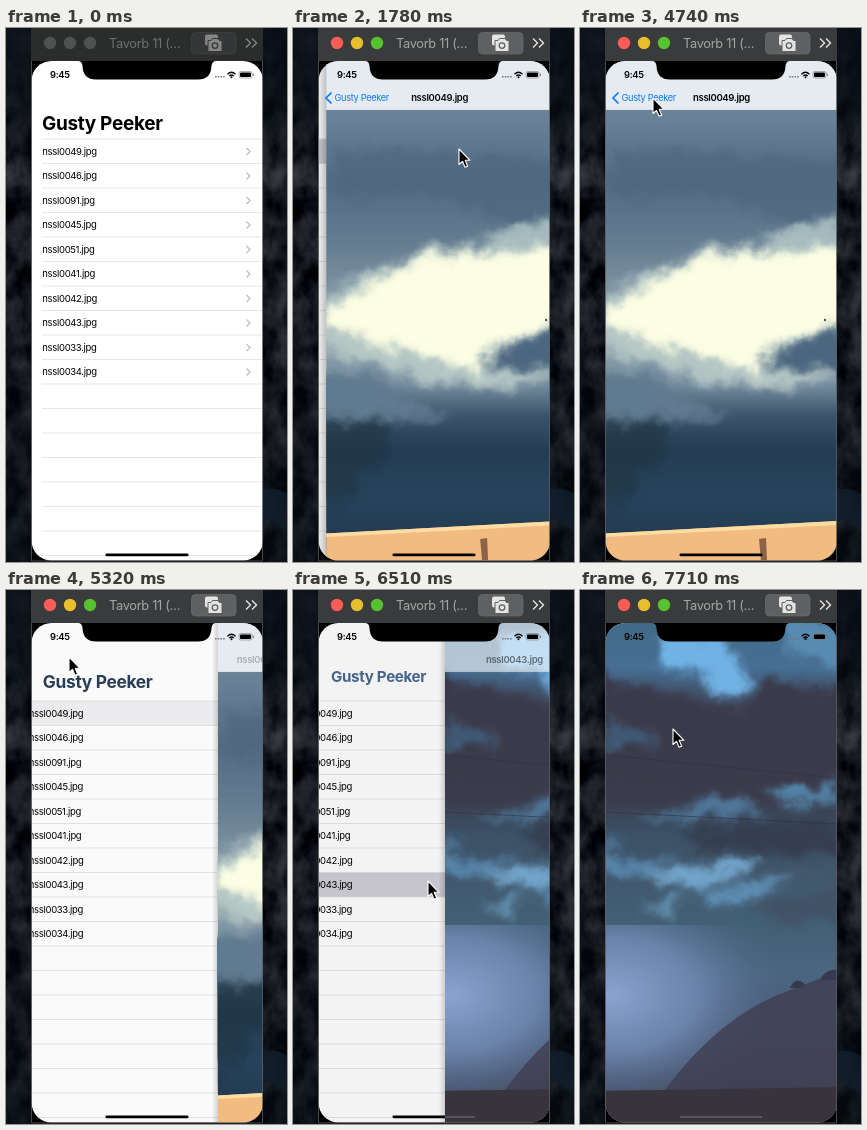
An HTML page that plays this animation: 281 by 534 pixels, repeating every 8000 ms.

```html
<!DOCTYPE html>
<html lang="en">
<head>
<meta charset="utf-8">
<style>
  html, body { margin: 0; width: 281px; height: 534px; overflow: hidden; background: #090d13; }
  svg { display: block; font-family: Inter, Roboto, sans-serif; letter-spacing: -.02em; }
</style>
</head>
<body>
<svg width="281" height="534" viewBox="0 0 281 534">
  <defs>
    <clipPath id="screen"><rect x="25.5" y="33" width="231.5" height="499.5" rx="20"/></clipPath>
    <filter id="rock" x="0" y="0" width="1" height="1" color-interpolation-filters="sRGB">
      <feTurbulence type="fractalNoise" baseFrequency=".045 .03" numOctaves="5" seed="8"/>
      <feColorMatrix values=".42 0 0 0 -.13  .42 0 0 0 -.12  .42 0 0 0 -.095  0 0 0 0 1"/>
    </filter>
    <filter id="cloud" filterUnits="userSpaceOnUse" x="0" y="20" width="281" height="530" color-interpolation-filters="sRGB">
      <feGaussianBlur stdDeviation="5" result="soft"/>
      <feTurbulence type="fractalNoise" baseFrequency=".035" numOctaves="4" seed="4"/>
      <feDisplacementMap in="soft" scale="26" xChannelSelector="R" yChannelSelector="G"/>
    </filter>
    <linearGradient id="night" x2="0" y2="1">
      <stop stop-color="#0a1018" stop-opacity=".85"/><stop offset=".16" stop-color="#0a1018" stop-opacity=".5"/>
      <stop offset=".25" stop-color="#0a1018" stop-opacity="0"/><stop offset=".6" stop-color="#0a1018" stop-opacity=".1"/>
      <stop offset="1" stop-color="#0a1018" stop-opacity=".55"/>
    </linearGradient>
    <linearGradient id="storm" gradientUnits="userSpaceOnUse" x1="0" y1="33" x2="0" y2="533">
      <stop stop-color="#71899c"/><stop offset=".12" stop-color="#698197"/><stop offset=".24" stop-color="#536b83"/>
      <stop offset=".36" stop-color="#647c90"/><stop offset=".55" stop-color="#90a5b0"/><stop offset=".65" stop-color="#728a9c"/>
      <stop offset=".71" stop-color="#3b536a"/><stop offset=".78" stop-color="#243d53"/><stop offset=".87" stop-color="#27435c"/>
      <stop offset="1" stop-color="#20374c"/>
    </linearGradient>
    <linearGradient id="dusk" gradientUnits="userSpaceOnUse" x1="0" y1="33" x2="0" y2="533">
      <stop stop-color="#416987"/><stop offset=".09" stop-color="#476f93"/><stop offset=".17" stop-color="#3c4052"/>
      <stop offset=".35" stop-color="#3b3b4b"/><stop offset=".42" stop-color="#3b5166"/><stop offset=".5" stop-color="#41576c"/>
      <stop offset=".6" stop-color="#426075"/><stop offset=".7" stop-color="#4b6580"/><stop offset="1" stop-color="#434a60"/>
    </linearGradient>
    <radialGradient id="glow" gradientUnits="userSpaceOnUse" cx="30" cy="405" r="175" gradientTransform="translate(0 140) scale(1 .655)">
      <stop stop-color="#8ba3d0"/><stop offset=".5" stop-color="#7189b3" stop-opacity=".85"/><stop offset="1" stop-color="#53698b" stop-opacity="0"/>
    </radialGradient>
    <linearGradient id="edge"><stop stop-opacity="0"/><stop offset="1" stop-opacity=".16"/></linearGradient>
  </defs>

  <rect width="281" height="534" filter="url(#rock)"/>
  <path d="M257 462Q270 458 281 466V502L257 490Z" fill="#14283c" opacity=".75"/>
  <rect width="281" height="534" fill="url(#night)"/>

  <path d="M25 0H257V534H25Z" fill="#000"/>
  <rect id="titleBar" x="25" width="232" height="33"/>
  <g id="lights"><circle cx="44" cy="15" r="6.2"/><circle cx="64" cy="15" r="6.2"/><circle cx="84" cy="15" r="6.2"/></g>
  <text id="device" x="103" y="20" font-size="12.8">Tavorb 11 (…</text>
  <rect id="shotButton" x="185.5" y="4.5" width="44.5" height="21.5" rx="4"/>
  <g id="tools">
    <rect x="199" y="6.5" width="13" height="11" rx="2"/>
    <path id="camera" d="M202 12.5H205L206.5 10.5H212L213.5 12.5H216V23.5H202Z" stroke-width="1"/>
    <circle id="lens" cx="209" cy="17.6" r="2.8" fill="none" stroke-width="1.3"/>
    <path id="more" d="M240 10.5L244.5 15L240 19.5M246 10.5L250.5 15L246 19.5" fill="none" stroke-width="1.4"/>
  </g>

  <g clip-path="url(#screen)">
    <rect x="25" y="33" width="232" height="500" fill="#fff"/>
    <g id="list">
      <rect id="selection" x="25" width="232" height="24.5" fill="#d0cfd5"/>
      <g id="rows" font-size="9.5"></g>
    </g>
    <text id="heading" font-weight="700">Gusty Peeker</text>
    <rect id="shade" x="25" y="33" width="232" height="500"/>

    <g id="detail">
      <rect x="19" y="33" width="6" height="500" fill="url(#edge)"/>
      <svg id="view" x="25" y="33" width="232" height="500" viewBox="25 33 232 500">
        <g id="stormPhoto">
          <rect x="25" y="33" width="232" height="500" fill="url(#storm)"/>
          <g filter="url(#cloud)">
            <path d="M40 175Q120 150 190 185T270 165V130L30 120Z" fill="#4f677f" opacity=".7"/>
            <path d="M185 215Q210 192 260 188V225Z" fill="#a4b9bd"/>
            <path d="M15 268Q70 250 105 228Q180 215 270 214V345Q200 372 140 352Q70 342 15 312Z" fill="#b4c6c4"/>
            <path d="M25 278Q80 256 105 234Q185 222 270 219V290L188 318L180 345Q130 330 90 320Q55 306 25 300Z" fill="#fcfee3"/>
            <path d="M270 295Q215 310 182 334Q210 349 270 345Z" fill="#4c6680"/>
            <path d="M10 350Q70 340 110 372L150 388L10 396Z" fill="#607a8f"/>
            <path d="M10 392H90V425L10 500Z" fill="#203442" opacity=".6"/>
          </g>
          <path d="M25 505.500L257 493V533H25Z" fill="#f2bc80"/>
          <path d="M25 505.500L257 493V497L25 509Z" fill="#ffdca2"/>
          <path d="M179 511L186 510L187 533H181Z" fill="#8d6347"/>
          <circle cx="245" cy="292" r="1.200" fill="#455564"/>
        </g>
        <g id="duskPhoto">
          <rect x="25" y="33" width="232" height="500" fill="url(#dusk)"/>
          <rect x="25" y="335" width="232" height="165" fill="url(#glow)"/>
          <g filter="url(#cloud)">
            <path d="M75 48L140 42L170 95L150 112L125 82L85 78Z" fill="#70b2e4"/>
            <path d="M190 30H265V75L215 70Z" fill="#588bb2"/>
            <path d="M15 80L60 100L120 110L160 130L190 90L270 100V195L15 195Z" fill="#3b3a4a"/>
            <path d="M25 130L65 140L80 158L25 158Z" fill="#3f5974"/>
            <path d="M190 200L215 191L235 202L255 186V214L205 214Z" fill="#5283a7"/>
            <path d="M50 225L100 220L152 207L185 222L120 232Z" fill="#4f789a"/>
            <path d="M90 240L200 228L265 236V268L130 262Z" fill="#363f51"/>
            <path d="M20 252L55 270L100 268L60 286L20 280Z" fill="#5584a8"/>
            <path d="M55 284L115 278L180 268L160 286L105 300Z" fill="#73a6cd"/>
            <path d="M120 302L175 292L215 284L180 308L130 315Z" fill="#5e8fb4"/>
            <path d="M60 312L115 308L85 323Z" fill="#6595b7"/>
            <path d="M170 310L265 295V330L200 335Z" fill="#425368"/>
          </g>
          <path d="M257 382L210 400Q140 425 85 500H257Z" fill="#403e50" opacity=".8"/>
          <path d="M210 398Q215 386 225 394L222 398ZM240 390Q246 378 257 380V390Z" fill="#363a4e"/>
          <path d="M25 165L257 188M25 222L257 234" fill="none" stroke="#30303e" stroke-width=".6"/>
          <path d="M25 501L257 497V533H25Z" fill="#38343d"/>
        </g>
        <g id="bar">
          <rect id="barFill" x="25" y="33" width="232" height="49" fill="#fafcff"/>
          <path d="M25 82H257" stroke="#8998a5" stroke-width=".5" opacity=".5"/>
        </g>
      </svg>
    </g>
    <g id="barText">
      <g id="back" fill="#0a7aff">
        <path d="M38.500 64.500L33 70L38.500 75.500" fill="none" stroke="#0a7aff" stroke-width="1.700"/>
        <text x="41.500" y="73.400" font-size="9.200">Gusty Peeker</text>
      </g>
      <text id="photoName" y="73.400" font-size="9.500" font-weight="600" text-anchor="middle"></text>
    </g>

    <path d="M72 33Q76 33 76.500 38Q77 51.500 90 51.500H192Q205 51.500 205.500 38Q206 33 210 33Z"/>
    <text x="44" y="50.300" font-size="9.400" font-weight="600">9:45</text>
    <path d="M209 48.700H219" stroke="#777" stroke-width="1.600" stroke-dasharray="1.600 1.100"/>
    <path d="M221.500 46.200Q225.500 42.500 229.500 46.200M223.300 48Q225.500 46 227.700 48" fill="none" stroke="#000" stroke-width="1.400"/>
    <circle cx="225.500" cy="49.300" r="1"/>
    <rect x="233" y="43.500" width="13" height="6.500" rx="1.800" fill="none" stroke="#777" stroke-width=".6"/>
    <rect x="234" y="44.400" width="11" height="4.700" rx="1"/>
    <path d="M247.300 45.600V48" stroke="#777"/>
    <rect x="99.500" y="525.500" width="83" height="2.700" rx="1.300"/>
    <rect id="dimIndicator" y="525.500" height="2.700" rx="1.300" fill="#59555c"/>
  </g>
  <path d="M25.500 33V533H256.500V33" fill="none" stroke="#5b5e61" stroke-width=".8"/>
  <path id="cursor" d="M0 0V15.500L3.500 12.300L6 18.300L8.700 17.200L6.200 11.300H11Z" stroke="#fff" stroke-width="1.100" stroke-linejoin="round"/>
</svg>
<script>
const LOOP = 8000, STEPS = 54;
const $ = id => document.getElementById(id);
const set = (id, attrs) => { for (const k in attrs) $(id).setAttribute(k, attrs[k]); };
const clamp = v => Math.max(0, Math.min(1, v));
const latest = (keys, step) => keys.filter(k => k[0] <= step).pop();

// Each key holds from its step until the next one.
const CURSOR = [
  [0, -50, -50], [2, 238, 345], [3, 223, 285], [4, 200, 205], [5, 176, 142], [6, 166, 121],
  [16, 161, 137], [17, 150, 185], [18, 130, 222], [19, 100, 205], [20, 82, 165], [21, 96.5, 140],
  [25, 93, 132], [26, 89, 123], [28, 82, 102], [31, 79, 88], [32, 73, 70], [35, 67, 68], [36, 63, 67],
  [38, 74, 115], [39, 105, 230], [40, 128, 305], [42, 135, 291], [50, 118, 225], [51, 94, 140], [52, 93, 139]
];
const PUSH = [
  [0, 0], [9, .138], [10, .6], [11, .87], [12, .965], [13, 1],
  [34, .97], [35, .52], [36, .194], [37, .06], [38, .02], [39, 0],
  [44, .453], [45, .8], [46, .94], [47, .985], [48, 1]
];
const BAR_HIDDEN = [[0, 0], [23, .45], [24, 1], [30, .5], [31, 0], [51, .5], [52, 1]];

const PHOTOS = [49, 46, 91, 45, 51, 41, 42, 43, 33, 34].map(n => `nssl00${n}.jpg`);
const TOP = 111, ROW = 24.5;
let rows = '';
for (let i = 0; i < 18; i++) {
  const y = TOP + i * ROW;
  rows += `<path d="M36 ${y}H257" stroke="#dcdce0" stroke-width=".7"/>`;
  if (PHOTOS[i]) rows += `<text x="36.300" y="${y + 15.8}">${PHOTOS[i]}</text>
    <path d="M240.500 ${y + 9}L244 ${y + 12.5}L240.500 ${y + 16}" fill="none" stroke="#bcbcc0" stroke-width="1.200"/>`;
}
$('rows').innerHTML = rows;

function drawWindow(active) {
  const icon = active ? '#e4e4e4' : '#858585', button = active ? '#5f6061' : '#353637';
  set('titleBar', { fill: active ? '#3a3b3c' : '#2b2c2c' });
  set('device', { fill: active ? '#a5a6a6' : '#707171' });
  set('shotButton', { fill: button, stroke: active ? '#6c6d6e' : '#414242', 'stroke-width': .7 });
  set('tools', { fill: icon });
  set('camera', { stroke: button });
  set('lens', { stroke: button });
  set('more', { stroke: icon });
  const colors = active ? ['#fc5b57', '#e5bf2c', '#57c22f'] : Array(3).fill('#505151');
  [...$('lights').children].forEach((c, i) => c.setAttribute('fill', colors[i]));
}

function draw(time) {
  const step = Math.floor(((time % LOOP) + 15) * STEPS / LOOP) % STEPS;
  const [, x, y] = latest(CURSOR, step);
  const p = latest(PUSH, step)[1];
  const hidden = latest(BAR_HIDDEN, step)[1];
  const picked = step < 40 ? 0 : 7, dusk = picked === 7;
  const offset = 232 * (1 - p);
  const pushing = step >= 8 && step < 34 || step >= 44;

  drawWindow(step >= 8);
  set('cursor', { transform: `translate(${x} ${y})` });

  set('list', { transform: `translate(${-69.6 * p} 0)` });
  set('selection', { y: TOP + picked * ROW, opacity: pushing ? 1 : clamp(1.6 * p) });
  const tint = clamp(p / .45) ** .6;
  set('heading', {
    x: 36 + 4.4 * p, y: 102 - 23 * p, 'font-size': 19 * (1 - .45 * p),
    fill: `rgb(${70 * tint},${104 * tint},${144 * tint})`, opacity: clamp(1 - (p - .45) * 2.5)
  });
  set('shade', { opacity: .1 * p });

  set('detail', { transform: `translate(${offset} 0)`, visibility: p ? 'visible' : 'hidden' });
  set('stormPhoto', { display: dusk ? 'none' : 'inline' });
  set('duskPhoto', { display: dusk ? 'inline' : 'none' });
  set('bar', { transform: `translate(0 ${-50 * hidden})` });
  set('barFill', { opacity: dusk ? .55 + .3 * p * p : .86 });
  set('barText', { transform: `translate(0 ${-50 * hidden})`, opacity: p && hidden < 1 ? 1 : 0 });
  set('back', { opacity: clamp((p - .6) / .3) * (step === 33 || step === 34 ? .4 : 1) });
  set('photoName', { x: 141.5 + .63 * offset, opacity: .08 + .92 * p });
  $('photoName').textContent = PHOTOS[picked];

  const left = Math.max(99.5, 25 + offset);
  set('dimIndicator', { x: left, width: dusk ? Math.max(0, 182.5 - left) : 0 });
}

const start = performance.now();
function tick() {
  draw(performance.now() - start);
  requestAnimationFrame(tick);
}
tick();
</script>
</body>
</html>
```
